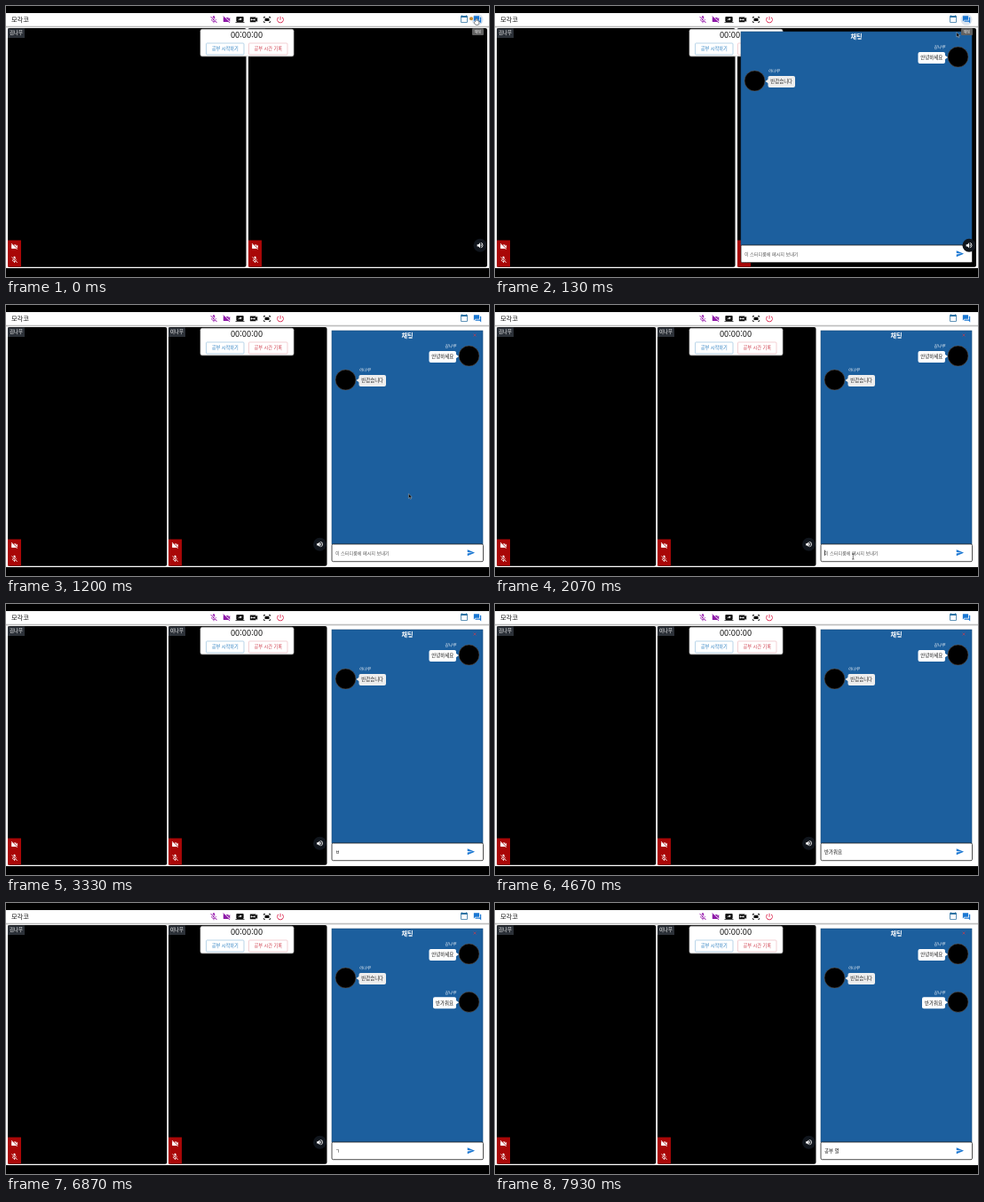
An HTML page for the animation above (8000 ms loop, 544 px wide and 306 px high).

```html
<!DOCTYPE html>
<html lang="ko">
<head>
<meta charset="utf-8">
<style>
  html, body { margin: 0; width: 100%; height: 100%; overflow: hidden; background: #000; }
  svg { display: block; width: 544px; height: 306px; }
  text { font-family: "Noto Sans CJK KR", "Noto Sans CJK", "Noto Sans", sans-serif; white-space: pre; }
</style>
</head>
<body>
<svg id="stage" viewBox="0 0 544 306"></svg>
<script>
const LOOP = 8000;
const ICONS = {
  mic: "M19 11h-1.7c0 .74-.16 1.43-.43 2.05l1.23 1.23c.56-.98.9-2.09.9-3.28zm-4.02.17c0-.06.02-.11.02-.17V5c0-1.66-1.34-3-3-3S9 3.34 9 5v.18l5.98 5.99zM4.27 3L3 4.27l6.01 6.01V11c0 1.66 1.33 3 2.99 3 .22 0 .44-.03.65-.08l1.66 1.66c-.71.33-1.5.52-2.31.52-2.76 0-5.3-2.1-5.3-5.1H5c0 3.41 2.72 6.23 6 6.72V21h2v-3.28c.91-.13 1.77-.45 2.54-.9L19.73 21 21 19.73z",
  cam: "M21 6.5l-4 4V7c0-.55-.45-1-1-1H9.82L21 17.18V6.5zM3.27 2L2 3.27 4.73 6H4c-.55 0-1 .45-1 1v10c0 .55.45 1 1 1h12c.21 0 .39-.08.54-.18L19.73 21 21 19.73z",
  share: "M20 18c1.1 0 2-.9 2-2V6c0-1.1-.9-2-2-2H4c-1.1 0-2 .9-2 2v10c0 1.1.9 2 2 2H0v2h24v-2h-4zm-7-3.5v-2.2c-2.8 0-4.6.8-6 2.7.6-2.7 2.1-5.3 6-5.9V7l4 3.7z",
  flip: "M18 9.5V6c0-.55-.45-1-1-1H3c-.55 0-1 .45-1 1v12c0 .55.45 1 1 1h14c.55 0 1-.45 1-1v-3.5l4 4v-13zm-5 6V13H7v2.5L3.5 12 7 8.5V11h6V8.5l3.5 3.5z",
  fit: "M17 4h3c1.1 0 2 .9 2 2v2h-2V6h-3zM4 8V6h3V4H4c-1.1 0-2 .9-2 2v2zm16 8v2h-3v2h3c1.1 0 2-.9 2-2v-2zM7 18H4v-2H2v2c0 1.1.9 2 2 2h3zM18 8H6v8h12z",
  power: "M13 3h-2v10h2zm4.83 2.17l-1.42 1.42A7 7 0 1 1 7.58 6.58L6.17 5.17a9 9 0 1 0 11.66 0z",
  calendar: "M20 3h-1V1h-2v2H7V1H5v2H4c-1.1 0-2 .9-2 2v16c0 1.1.9 2 2 2h16c1.1 0 2-.9 2-2V5c0-1.1-.9-2-2-2zm0 18H4V8h16z",
  chat: "M21 6h-2v9H6v2c0 .55.45 1 1 1h11l4 4V7c0-.55-.45-1-1-1zm-4 6V3c0-.55-.45-1-1-1H3c-.55 0-1 .45-1 1v14l4-4h10c.55 0 1-.45 1-1z",
  sound: "M3 9v6h4l5 5V4L7 9zm13.5 3A4.5 4.5 0 0 0 14 8v8a4.5 4.5 0 0 0 2.5-4zM14 3.2v2.1a7 7 0 0 1 0 13.4v2.1a9 9 0 0 0 0-17.6z",
  send: "M2 21l21-9L2 3v7l15 2-15 2z"
};
const ME = "김나무", PEER = "이나무";

const rect = (x, y, w, h, fill, more = "") =>
  `<rect x="${x}" y="${y}" width="${w}" height="${h}" fill="${fill}" ${more}/>`;
const text = (s, x, y, size, fill, more = "") =>
  `<text x="${x}" y="${y}" font-size="${size}" fill="${fill}" ${more}>${s}</text>`;
const icon = (name, x, y, size, fill) =>
  `<path d="${ICONS[name]}" fill="${fill}" transform="translate(${x - size / 2} ${y - size / 2}) scale(${size / 24})"/>`;
const group = (id, body) => `<g id="${id}">${body}</g>`;
const middle = 'text-anchor="middle"';

const tags = name =>
  rect(0, 25.5, 19, 10.5, "#2c3138") + text(name, 2, 32.3, 5.4, "#fff", 'font-weight="500"') +
  rect(0, 264.5, 15, 30, "#a90707") +
  icon("cam", 7.5, 271.7, 9, "#fff") + icon("mic", 7.5, 286.5, 9, "#fff");

const button = (x, w, label, color, edge) =>
  rect(x, 42, w, 13, "#fff", `rx="1" stroke="${edge}" stroke-width=".7"`) +
  text(label, x + w / 2, 50.3, 5.2, color, middle + ' font-weight="500"');

const avatar = (x, y) =>
  `<circle cx="${x}" cy="${y}" r="11.5" stroke="#5f5a58" stroke-width=".6"/>`;
const nameTag = (s, x, y, more) =>
  text(s, x, y, 4.7, "#fff", more + ' font-style="italic" font-weight="500"');
const mine = (y, w, s) =>
  avatar(521.5, y) + nameTag(ME, 507, y - 9.2, 'text-anchor="end"') +
  rect(507 - w, y - 5.5, w, 13, "#fff", 'rx="2"') +
  `<path d="M506.5 ${y - 2}l3.5 2.5-3.5 2.5z" fill="#fff"/>` +
  text(s, 507 - w / 2, y + 2.8, 5.4, "#111", middle);
const theirs =
  avatar(382.5, 84.5) + nameTag(PEER, 397.5, 75.3, "") +
  rect(397.5, 79, 30.5, 13, "#eee", 'rx="2"') +
  '<path d="M398 82.5l-3.5 2.5 3.5 2.5z" fill="#eee"/>' +
  text("반갑습니다", 412.7, 87.3, 5.4, "#222", middle);

const tools = [["mic", 234, "#9c27b0"], ["cam", 248.5, "#8e1aa8"], ["share", 263.5, "#111"],
  ["flip", 279, "#111"], ["fit", 294, "#111"], ["power", 309, "#d81b45"]];

document.getElementById("stage").innerHTML =
  rect(0, 8, 544, 288, "#fff") + rect(0, 22.7, 544, 1.6, "#bdbdbd") +
  text("모각코", 6, 18.2, 7.2, "#111") +
  tools.map(([n, x, c]) => icon(n, x, 15.4, 10, c)).join("") +
  icon("calendar", 516, 14.5, 9.5, "#2f73a3") +
  '<circle id="halo" cx="531" cy="15.3" r="6.5" fill="#dde6f0"/>' +
  icon("chat", 531, 15.3, 10, "#1976d2") +
  rect(2, 25, 268, 269.7, "#000", 'id="tileA" rx="2"') +
  rect(273, 25, 269, 269.7, "#000", 'id="tileB" rx="2"') +
  `<g transform="translate(2)">${tags(ME)}</g>` + group("tagsB", tags(PEER)) +
  rect(219, 26.3, 105, 30.5, "#fff", 'rx="2" stroke="#c8c8c8" stroke-width=".7"') +
  text("00:00:00", 271, 36.2, 9.3, "#111", middle) +
  button(225.5, 42.5, "공부 시작하기", "#2a7fc0", "#9cc3e0") +
  button(273.5, 43.5, "공부 시간 기록", "#cf3f4d", "#eebcc2") +
  group("panel",
    rect(367, 29, 170, 241, "#1c5f9e", 'id="back" stroke="#1a4a78" stroke-width=".6"') +
    text("채팅", 452, 37, 7.2, "#fff", 'id="title" font-weight="700" ' + middle) +
    '<path id="close" d="M526.5 32.5l3 3m0-3l-3 3" stroke="#a8425a" stroke-width=".8"/>' +
    mine(57.5, 30.5, "안녕하세요") + group("peer", theirs) +
    group("sent", mine(111.8, 26, "반가워요")) +
    rect(367, 270, 170.5, 19.7, "#fff", 'id="field" rx="1.5" stroke="#222" stroke-width=".8"') +
    text("", 371, 282, 5.4, "#111", 'id="entry"') +
    '<path id="caret" d="M371.5 276.7v6.3" stroke="#111" stroke-width=".7"/>' +
    icon("send", 523.7, 279.8, 9.5, "#1976d2")) +
  group("sound", '<circle cx="-8" cy="270.3" r="7.5" fill="#10151c"/>' + icon("sound", -8, 270.3, 9, "#fff")) +
  group("tip", rect(525, 25.3, 13, 7.7, "#616161", 'rx="1"') + text("채팅", 531.5, 30.7, 4, "#fff", middle)) +
  '<circle id="dot" cx="524" cy="14.3" r="2" fill="#c8892c"/>' +
  '<path id="hand" d="M-.8 0v-2.5q.8-1 1.6 0v2l2 .6v2.4l-.8 1.8h-3l-2-2.6z" fill="#fff" stroke="#222" stroke-width=".5"/>' +
  '<path id="arrow" d="M0 0v5.2l1.2-1.1.9 2 .9-.4-.9-1.9h1.7z" fill="#000" stroke="#ddd" stroke-width=".4"/>' +
  '<path id="beam" d="M-1.3-3h2.6M0-3v6M-1.3 3h2.6" stroke="#222" stroke-width=".6"/>';

const el = id => document.getElementById(id);
const set = (id, attrs) => { for (const k in attrs) el(id).setAttribute(k, attrs[k]); };
const show = (id, on) => set(id, { visibility: on ? "visible" : "hidden" });
const mix = (a, b, p) => a + (b - a) * p;
const clamp = v => Math.min(1, Math.max(0, v));
const ease = p => p < .5 ? 4 * p ** 3 : 1 - 4 * (1 - p) ** 3;

// time, typed text
const typing = [[0, ""], [3200, "ㅂ"], [3470, "바"], [3600, "반"], [3800, "반ㄱ"], [4000, "반가"],
  [4330, "반강"], [4400, "반가우"], [4530, "반가워"], [4670, "반가워요"], [5000, ""],
  [6870, "ㄱ"], [6930, "고"], [7000, "공"], [7130, "공ㅂ"], [7270, "공부"], [7400, "공부 "],
  [7530, "공부 ㅇ"], [7670, "공부 여"], [7930, "공부 열"]];
// time, x, y
const pointer = [[0, 530, 17], [70, 530, 17], [400, 475.5, 86], [1000, 454, 212],
  [1200, 453.5, 213], [2000, 403.3, 284], [LOOP, 403.3, 284]];
const caretOn = [[2000, 2500], [3000, 3200], [5000, 5470], [5970, 6470]];

function pointerAt(t) {
  const i = pointer.findIndex(k => k[0] > t);
  const a = pointer[i - 1], b = pointer[i], p = (t - a[0]) / (b[0] - a[0]);
  return [mix(a[1], b[1], p), mix(a[2], b[2], p)];
}

function draw(t) {
  const p = ease(clamp((t - 130) / 540));
  const left = mix(277, 367, p), bLeft = mix(273, 183, p), bRight = mix(542, 361.5, p);
  set("tileA", { width: mix(268.5, 179.3, p) - 6 * Math.sin(Math.PI * p) });
  set("tileB", { x: bLeft, width: bRight - bLeft });
  set("tagsB", { transform: `translate(${bLeft})` });
  set("sound", { transform: `translate(${bRight})` });

  el("panel").style.display = t >= 130 ? "" : "none";
  set("back", { x: left, width: 537 - left });
  set("field", { x: left, width: 537.5 - left });
  set("title", { x: (left + 537) / 2 });
  set("peer", { transform: `translate(${left - 367})` });
  show("close", t > 670);
  show("sent", t >= 5000);

  const typed = typing.filter(k => k[0] <= t).pop()[1];
  el("entry").textContent = typed || "이 스터디룸에 메시지 보내기";
  set("entry", { x: left + 4, "font-size": typed ? 5.4 : 5.1, fill: typed ? "#111" : "#555" });
  show("caret", caretOn.some(([a, b]) => t >= a && t < b));

  const [x, y] = pointerAt(t), inField = y > 272;
  for (const id of ["hand", "arrow", "beam"]) set(id, { transform: `translate(${x} ${y})` });
  show("hand", y < 22);
  show("arrow", y >= 22 && !inField);
  show("beam", inField && (t < 2800 || (t >= 5800 && t < 6870)));
  show("dot", t < 130);
  show("halo", t < 500);
  set("tip", { opacity: clamp((700 - t) / 250) });
}

function tick(now) {
  draw(now % LOOP);
  requestAnimationFrame(tick);
}
draw(0);
requestAnimationFrame(tick);
</script>
</body>
</html>
```
